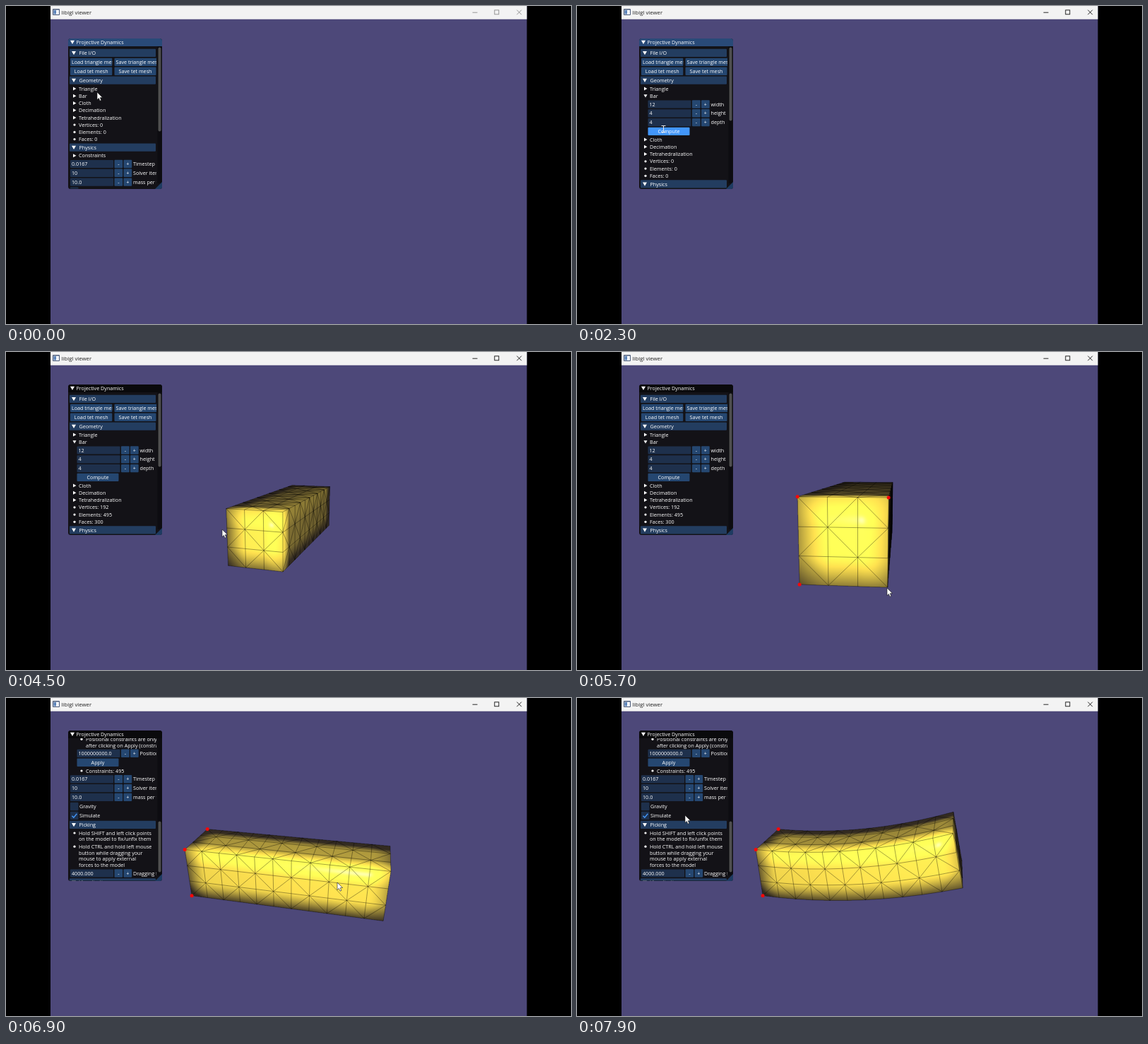
Write an HTML page with a canvas that moves like this. It is 800 px wide and 450 px high and loops after 8000 ms.

```html
<!DOCTYPE html>
<html lang="en">
<head>
<meta charset="utf-8">
<title>Viewer</title>
<style>
html, body { margin: 0; width: 100%; height: 100%; overflow: hidden; background: #000; }
canvas { display: block; }
</style>
</head>
<body>
<canvas id="stage" width="800" height="450"></canvas>
<script>
const LOOP = 8000, STEP = 100;
const g = document.getElementById('stage').getContext('2d');

// Moments of hard change
const T = { focus: 500, expand: 700, beamOn: 1400, hover: 2200, beamOff: 2400, compute: 2500,
  blur: 3300, panel: 6250, scroll: 6300, simulate: 6500, leave: 6800 };

// time, x, y of the pointer tip
const pointerKeys = [
  [0, 129, 122], [300, 129, 122], [600, 106, 126], [1200, 106, 127], [1500, 130, 139],
  [2000, 128, 160], [2300, 122, 174], [2500, 124, 177], [2700, 160, 182], [3000, 480, 225],
  [3300, 612, 282], [3700, 550, 281], [4100, 430, 262], [4500, 306, 251], [4700, 340, 236],
  [5000, 443, 207], [5200, 315, 206], [5450, 317, 331], [5700, 439, 334], [5800, 440, 334],
  [6100, 300, 250], [6300, 150, 180], [6500, 99, 165], [6650, 99, 166], [6900, 469, 261],
  [7100, 475, 276], [7500, 480, 205], [7900, 153, 166]
];
// time, yaw, pitch (degrees), camera distance, centre y
const viewKeys = [
  [3300, 0, 0, 26.9, 236], [3700, 43.9, 6.3, 26.9, 236], [4500, 72, 11.6, 23.4, 236],
  [4900, 84.2, 8.2, 17.6, 236], [5800, 84.2, 8.2, 17.6, 236], [6200, -13, 29, 21.1, 245.5]
];
const bendKeys = [[6900, 0], [7100, -0.06], [7500, 0.3], [7700, 0.39], [7900, 0.37]];
const pins = [[5000, 0, 3, 3], [5200, 0, 3, 0], [5450, 0, 0, 0], [5800, 0, 0, 3]];

function track(keys, t) {
  if (t <= keys[0][0]) return keys[0].slice(1);
  for (let i = 1; i < keys.length; i++) {
    const a = keys[i - 1], b = keys[i];
    if (t > b[0]) continue;
    const u = (t - a[0]) / (b[0] - a[0]), e = u * u * (3 - 2 * u);
    return a.slice(1).map((v, n) => v + (b[n + 1] - v) * e);
  }
  return keys[keys.length - 1].slice(1);
}

// ---- Bar mesh: 12 x 4 x 4 vertices ----
const DIM = [11, 3, 3];
const vid = (i, j, k) => (i * 4 + j) * 4 + k;
const tris = [];

function addQuad(q) {
  const [a, b, c, d] = q.map(p => vid(...p));
  const odd = (q[0][0] + q[0][1] + q[0][2]) % 2;
  if (odd) tris.push([a, b, c], [a, c, d]);
  else tris.push([a, b, d], [b, c, d]);
}

for (let n = 0; n < 3; n++) {
  const u = (n + 1) % 3, v = (n + 2) % 3;
  for (const side of [0, DIM[n]])
    for (let i = 0; i < DIM[u]; i++)
      for (let j = 0; j < DIM[v]; j++) {
        const q = [[0, 0], [1, 0], [1, 1], [0, 1]].map(([du, dv]) => {
          const p = [0, 0, 0];
          p[n] = side; p[u] = i + du; p[v] = j + dv;
          return p;
        });
        addQuad(side ? q : q.reverse());
      }
}

function bent(x, y, z, curve) {
  if (Math.abs(curve) < 1e-4) return [x, y, z];
  const a = curve * (x + 5.5) / 11, r = 11 / curve, tilt = 0.75 * a;
  return [-5.5 + r * Math.sin(a) - y * Math.sin(tilt), r * (1 - Math.cos(a)) + y * Math.cos(tilt), z];
}

const FOCAL = 520;
const AREA = { x: 200, y: 110, w: 400, h: 270, s: 2 };
const buf = document.createElement('canvas');
buf.width = AREA.w * AREA.s;
buf.height = AREA.h * AREA.s;
const bg = buf.getContext('2d');

function poseMesh(t) {
  const [yaw, pitch, dist, cy] = track(viewKeys, t), [curve] = track(bendKeys, t);
  const rad = Math.PI / 180;
  const s = Math.sin(yaw * rad), c = Math.cos(yaw * rad);
  const sp = Math.sin(pitch * rad), cp = Math.cos(pitch * rad);
  const verts = [];
  for (let i = 0; i < 12; i++) for (let j = 0; j < 4; j++) for (let k = 0; k < 4; k++) {
    const [x, y, z] = bent(i - 5.5, j - 1.5, k - 1.5, curve);
    const rx = x * c + z * s, rz = z * c - x * s;
    const ey = y * cp - rz * sp, ez = y * sp + rz * cp - dist;
    verts.push({ p: [rx, ey, ez], n: [0, 0, 0], sx: 400 - FOCAL * rx / ez, sy: cy + FOCAL * ey / ez });
  }
  for (const tri of tris) {
    const [a, b, d] = tri.map(i => verts[i].p);
    const e = b.map((v, i) => v - a[i]), f = d.map((v, i) => v - a[i]);
    const n = [e[1] * f[2] - e[2] * f[1], e[2] * f[0] - e[0] * f[2], e[0] * f[1] - e[1] * f[0]];
    for (const i of tri) n.forEach((v, m) => verts[i].n[m] += v);
  }
  for (const v of verts) {
    const len = Math.hypot(...v.n) || 1;
    v.n = v.n.map(q => q / len);
  }
  return { verts, light: 0.06 * dist };
}

// Phong shading with a light just above the eye
function shade(px, o, x, y, z, nx, ny, nz, light) {
  const nl = 1 / Math.sqrt(nx * nx + ny * ny + nz * nz);
  nx *= nl; ny *= nl; nz *= nl;
  let lx = -x, ly = light - y, lz = -z;
  const ll = 1 / Math.sqrt(lx * lx + ly * ly + lz * lz);
  lx *= ll; ly *= ll; lz *= ll;
  const d = nx * lx + ny * ly + nz * lz, dif = Math.max(d, 0);
  const el = -1 / Math.sqrt(x * x + y * y + z * z);
  const r = ((2 * d * nx - lx) * x + (2 * d * ny - ly) * y + (2 * d * nz - lz) * z) * el;
  const spec = d > 0 && r > 0 ? Math.pow(r, 35) : 0;
  px[o] = 51 + 255 * dif + 255 * spec;
  px[o + 1] = 43 + 228 * dif + 235 * spec;
  px[o + 2] = 33 + 58 * dif + 80 * spec;
  px[o + 3] = 255;
}

function fillTri(px, A, B, C, light) {
  const S = AREA.s, W = buf.width, H = buf.height;
  const X = v => (v.sx - AREA.x) * S, Y = v => (v.sy - AREA.y) * S;
  const ax = X(A), ay = Y(A), bx = X(B), by = Y(B), cx = X(C), cy = Y(C);
  const det = (by - cy) * (ax - cx) + (cx - bx) * (ay - cy);
  if (!det) return;
  const x0 = Math.max(0, Math.floor(Math.min(ax, bx, cx))), x1 = Math.min(W - 1, Math.ceil(Math.max(ax, bx, cx)));
  const y0 = Math.max(0, Math.floor(Math.min(ay, by, cy))), y1 = Math.min(H - 1, Math.ceil(Math.max(ay, by, cy)));
  const p = A.p, q = B.p, r = C.p, l = A.n, m = B.n, n = C.n, eps = -1e-6;
  for (let y = y0; y <= y1; y++) for (let x = x0; x <= x1; x++) {
    const dx = x + 0.5 - cx, dy = y + 0.5 - cy;
    const u = ((by - cy) * dx + (cx - bx) * dy) / det;
    const v = ((cy - ay) * dx + (ax - cx) * dy) / det;
    const w = 1 - u - v;
    if (u < eps || v < eps || w < eps) continue;
    shade(px, (y * W + x) * 4,
      u * p[0] + v * q[0] + w * r[0], u * p[1] + v * q[1] + w * r[1], u * p[2] + v * q[2] + w * r[2],
      u * l[0] + v * m[0] + w * n[0], u * l[1] + v * m[1] + w * n[1], u * l[2] + v * m[2] + w * n[2], light);
  }
}

function drawBar(t) {
  const { verts, light } = poseMesh(t);
  const img = bg.createImageData(buf.width, buf.height);
  const edges = new Set(), seen = new Set();
  for (const tri of tris) {
    const [A, B, C] = tri.map(i => verts[i]);
    const turn = (B.sx - A.sx) * (C.sy - A.sy) - (B.sy - A.sy) * (C.sx - A.sx);
    if (turn >= 0) continue;
    fillTri(img.data, A, B, C, light);
    tri.forEach((a, n) => {
      const b = tri[(n + 1) % 3];
      seen.add(a);
      edges.add(Math.min(a, b) * 1000 + Math.max(a, b));
    });
  }
  bg.putImageData(img, 0, 0);
  g.drawImage(buf, AREA.x, AREA.y, AREA.w, AREA.h);
  g.beginPath();
  for (const e of edges) {
    const a = verts[Math.floor(e / 1000)], b = verts[e % 1000];
    g.moveTo(a.sx, a.sy);
    g.lineTo(b.sx, b.sy);
  }
  g.strokeStyle = 'rgba(0,0,0,0.55)';
  g.lineWidth = 0.65;
  g.stroke();
  for (const [at, ...ijk] of pins) {
    const id = vid(...ijk);
    if (t >= at && seen.has(id)) disc(verts[id].sx, verts[id].sy, 2.5, '#f80808');
  }
}

// ---- Drawing helpers ----
function rect(x, y, w, h, color, radius = 0) {
  g.fillStyle = color;
  g.beginPath();
  g.roundRect(x, y, w, h, radius);
  g.fill();
}

function disc(x, y, r, color) {
  g.fillStyle = color;
  g.beginPath();
  g.arc(x, y, r, 0, 7);
  g.fill();
}

function poly(points, color) {
  g.fillStyle = color;
  g.beginPath();
  points.forEach(([x, y]) => g.lineTo(x, y));
  g.closePath();
  g.fill();
}

function label(s, x, y, align = 'left', size = 7.2, color = '#fff') {
  g.font = size + 'px "Open Sans", "Noto Sans", sans-serif';
  g.textAlign = align;
  g.fillStyle = color;
  g.fillText(s, x, y + 2.6);
}

function clipped(x, y, w, h, draw) {
  g.save();
  g.beginPath();
  g.rect(x, y, w, h);
  g.clip();
  draw();
  g.restore();
}

// ---- Panel widgets; y is the middle of the row ----
const BUTTON = '#254771', HOT = '#4296fa', FIELD = '#1e304c', HEADER = '#233d60';

function arrow(x, y, open, r) {
  if (open) poly([[x - r, y - r * 0.8], [x + r, y - r * 0.8], [x, y + r * 0.95]], '#fff');
  else poly([[x - r * 0.8, y - r], [x + r * 0.95, y], [x - r * 0.8, y + r]], '#fff');
}

function header(s, y) {
  rect(90, y - 5.6, 122, 11.2, HEADER, 1);
  arrow(96, y, true, 3);
  label(s, 103.5, y);
}

function button(s, x, y, w, hot) {
  rect(x, y - 5.7, w, 11.4, hot ? HOT : BUTTON, 1);
  clipped(x + 1.5, y - 6, w - 1.5, 12, () => {
    if (s.length > 13) label(s, x + 2, y);
    else label(s, x + w / 2, y, 'center');
  });
}

function field(value, name, x, y) {
  rect(x, y - 5.6, 61, 11.2, FIELD, 1);
  label(value, x + 2, y);
  button('-', x + 62.5, y, 11.7);
  button('+', x + 75.5, y, 11.7);
  label(name, x + 89, y);
}

function tree(s, y, open = false) {
  arrow(97, y, open, 2.5);
  label(s, 103, y);
}

function bullet(s, x, y) {
  disc(x - 6, y, 1.6, '#fff');
  label(s, x, y);
}

function checkbox(s, y, on) {
  rect(91, y - 5.7, 11.5, 11.4, FIELD, 1);
  if (on) {
    g.strokeStyle = HOT;
    g.lineWidth = 1.4;
    g.beginPath();
    g.moveTo(93.5, y + 0.3);
    g.lineTo(95.8, y + 2.7);
    g.lineTo(100.3, y - 2.6);
    g.stroke();
  }
  label(s, 104, y);
}

function physicsFields(y) {
  field('0.0167', 'Timestep', 91, y);
  field('10', 'Solver iterations', 91, y + 12.8);
  field('10.0', 'mass per vertex', 91, y + 25.6);
}

function topContent(t) {
  const open = t >= T.expand, done = t >= T.compute, dy = open ? 51.7 : 0;
  header('File I/O', 66.3);
  button('Load triangle mesh', 91, 79.4, 59.3);
  button('Save triangle mesh', 153.5, 79.4, 60);
  button('Load tet mesh', 91, 92.2, 59.3);
  button('Save tet mesh', 153.5, 92.2, 59);
  header('Geometry', 105.2);
  tree('Triangle', 117);
  tree('Bar', 127.2, open);
  if (open) {
    [['12', 'width'], ['4', 'height'], ['4', 'depth']].forEach(([v, s], i) => field(v, s, 100.5, 139 + i * 12.8));
    button('Compute', 100.5, 177.4, 59, t >= T.hover && t < T.compute + 100);
  }
  tree('Cloth', 137.4 + dy);
  tree('Decimation', 147.6 + dy);
  tree('Tetrahedralization', 157.9 + dy);
  bullet('Vertices: ' + (done ? 192 : 0), 103, 168.1 + dy);
  bullet('Elements: ' + (done ? 495 : 0), 103, 178.4 + dy);
  bullet('Faces: ' + (done ? 300 : 0), 103, 188.6 + dy);
  header('Physics', 200.2 + dy);
  tree('Constraints', 211.8 + dy);
  physicsFields(223.5 + dy);
  checkbox('Gravity', 262.2 + dy, false);
}

function lowContent(t) {
  bullet('Positional constraints are only', 113, 58.3);
  label('after clicking on Apply (constraints)', 113, 67);
  field('1000000000.0', 'Positional weight', 100.5, 78.3);
  button('Apply', 100.5, 91.2, 59);
  bullet('Constraints: 495', 113, 103);
  physicsFields(114.8);
  checkbox('Gravity', 153.5, false);
  checkbox('Simulate', 166.4, t >= T.simulate);
  header('Picking', 179.3);
  bullet('Hold SHIFT and left click points', 103, 191);
  label('on the model to fix/unfix them', 103, 199.5);
  bullet('Hold CTRL and hold left mouse', 103, 210.2);
  ['button while dragging your', 'mouse to apply external', 'forces to the model']
    .forEach((s, i) => label(s, 103, 218.9 + i * 8.7));
  field('4000.000', 'Dragging force', 91, 248);
  header('Visualization', 260.8);
}

function drawPanel(t) {
  const low = t >= T.scroll;
  const active = t < T.blur || (t >= T.panel && t < T.leave);
  rect(88, 46, 133, 213, '#131217', 3.5);
  rect(88, 46, 133, 11, active ? '#294a78' : '#0a0a0c', [3.5, 3.5, 0, 0]);
  arrow(94, 51.2, true, 3);
  label('Projective Dynamics', 99.5, 51.2);
  clipped(88, 57, 125, 201.5, () => low ? lowContent(t) : topContent(t));
  rect(214.5, 57, 6, 194, '#0d0c11');
  const [y, h] = low ? [174.5, 72] : [58.5, t < T.expand ? 119 : 104];
  rect(215.5, y, 4, h, '#4f4f4f', 2);
  poly([[221, 249], [221, 257], [219, 259], [211, 259]], '#1e3b62');
}

function drawWindow(t) {
  rect(0, 0, 800, 450, '#000');
  rect(63, 0, 674.5, 450, '#4d4879');
  rect(63, 0, 674.5, 18.7, '#f3f3f3');
  rect(66, 4, 10, 9, '#4a5a78', 1);
  rect(67, 5.5, 8, 6.5, '#f4f7fb');
  rect(67.4, 6, 3.6, 5.5, '#5b82b8');
  label('libigl viewer', 78.5, 9, 'left', 7.8, '#222');
  g.strokeStyle = t < T.focus ? '#8c8c8c' : '#111';
  g.lineWidth = 0.9;
  g.strokeRect(691.8, 5.8, 6, 6);
  g.beginPath();
  g.moveTo(660.5, 9.2); g.lineTo(667.5, 9.2);
  g.moveTo(723.3, 5.6); g.lineTo(729.9, 12.2);
  g.moveTo(729.9, 5.6); g.lineTo(723.3, 12.2);
  g.stroke();
}

function drawPointer(t) {
  const [x, y] = track(pointerKeys, t);
  g.save();
  g.translate(x, y);
  if (t >= T.beamOn && t < T.beamOff) {
    g.strokeStyle = '#e8e8e8';
    g.lineWidth = 1;
    g.beginPath();
    g.moveTo(-2.5, -4.5); g.lineTo(3.5, -4.5);
    g.moveTo(0.5, -4.5); g.lineTo(0.5, 4.5);
    g.moveTo(-2.5, 4.5); g.lineTo(3.5, 4.5);
    g.stroke();
  } else {
    const shape = [[0, 0], [0, 10.6], [2.4, 8.4], [4, 12.2], [5.9, 11.4], [4.3, 7.7], [7.6, 7.5]];
    poly(shape, '#fff');
    g.strokeStyle = '#111';
    g.lineWidth = 0.6;
    g.stroke();
  }
  g.restore();
}

function draw(t) {
  drawWindow(t);
  if (t >= T.compute) drawBar(t);
  drawPanel(t);
  drawPointer(t);
}

let last = -1;
const start = performance.now();
function tick() {
  const t = Math.floor((performance.now() - start) % LOOP / STEP) * STEP;
  if (t !== last) draw(last = t);
  requestAnimationFrame(tick);
}
tick();
</script>
</body>
</html>
```
